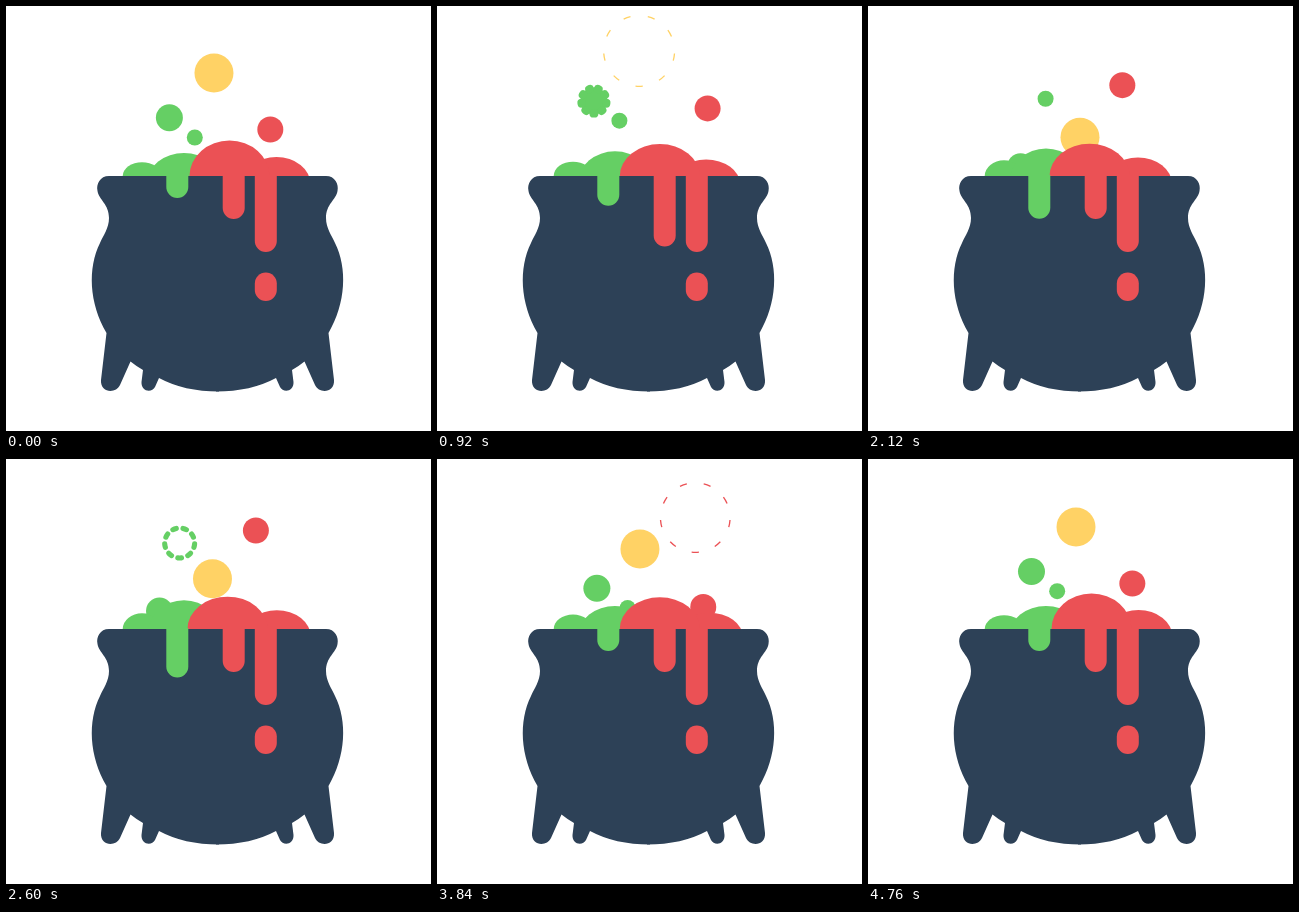
Animation of 425 by 425 pixels, one loop 4800 ms. Source, as an HTML page with a canvas:

```html
<!DOCTYPE html>
<html>
<head>
<meta charset="utf-8">
<style>
  html, body { margin: 0; width: 100%; height: 100%; overflow: hidden; background: #fff; }
  canvas { display: block; width: 425px; height: 425px; }
</style>
</head>
<body>
<canvas id="stage"></canvas>
<script>
const LOOP = 4800, BURST = 400, TAU = 2 * Math.PI;
const RED = '#eb5155', GREEN = '#65cf64', YELLOW = '#ffd265', NAVY = '#2d4157';
const canvas = document.getElementById('stage');
const ctx = canvas.getContext('2d');
const ratio = window.devicePixelRatio || 1;
canvas.width = canvas.height = 425 * ratio;
ctx.scale(ratio, ratio);

// A bubble rises between two heights, sways through evenly timed x positions, then bursts.
const bubbles = [
  { color: YELLOW, r: 19.5, spread: 37.5, birth: 800, pop: 5360, from: 163, to: 44, ease: 1,
    sway: [217, 215, 205, 202.8, 208, 202] },
  { color: GREEN, r: 13.5, spread: 31, birth: 1700, pop: 5680, from: 168.4, to: 88.4, ease: 1,
    sway: [152, 155.3, 163.7, 155] },
  { color: GREEN, r: 8, spread: 27, birth: 3200, pop: 7220, from: 160.7, to: 80, ease: 1,
    sway: [187, 192, 183.5, 180.5, 172.5] },
  { color: RED, r: 13, spread: 37.5, birth: 3100, pop: 8280, from: 168.6, to: 58.5, ease: 1.45,
    sway: [267, 266, 264.5, 270.5, 255.5, 249, 258.5] }
];

const pot = new Path2D(`M213 170H103C94 170 90 178 91.5 185C93 194 103 198 103 212
  C103 222 97 230 94 237C81.5 262 83 297 100.5 327L95 374C94 387 110 388 114 379
  L124.5 355.5Q130 360 137 364L135.5 376C135 386 146 387 149 381L153 372Q178 385.5 213 385.5Z`);

// Smooth curve through evenly spaced values, u from 0 to 1.
function curve(values, u) {
  const at = k => values[Math.max(0, Math.min(values.length - 1, k))];
  const pos = u * (values.length - 1), i = Math.floor(pos), f = pos - i;
  const [a, b, c, d] = [at(i - 1), at(i), at(i + 1), at(i + 2)];
  return b + f / 2 * (c - a + f * (2 * a - 5 * b + 4 * c - d + f * (3 * (b - c) + d - a)));
}

// Climbs from 0 to 1 until `peak`, then eases back to 0 by `end`.
function swell(t, peak, end) {
  if (t < peak) return (t / peak) ** 1.2;
  return t < end ? (1 + Math.cos(Math.PI * (t - peak) / (end - peak))) / 2 : 0;
}

function ellipse(x, y, rx, ry, color) {
  ctx.fillStyle = color;
  ctx.beginPath();
  ctx.ellipse(x, y, rx, ry, 0, 0, TAU);
  ctx.fill();
}

const mound = (x, top, base, rx, color) => ellipse(x, base, rx, base - top, color);

function pill(x, top, bottom, color, radii) {
  ctx.fillStyle = color;
  ctx.beginPath();
  ctx.roundRect(x, top, 22, bottom - top, radii);
  ctx.fill();
}

const drip = (x, bottom, color) => pill(x, 169, bottom, color, [0, 0, 11, 11]);

function burst(x, y, p, { color, r, spread }) {
  if (p < 0.15) ellipse(x, y, r, r, color);
  const inner = r - 3;
  const radius = inner + (spread - inner) * p;
  const half = 4 * p / radius + 0.001;
  ctx.strokeStyle = color;
  ctx.lineWidth = 9 - 8.5 * p;
  ctx.lineCap = p < 0.8 ? 'round' : 'butt';
  for (let i = 0; i < 9; i++) {
    const angle = TAU / 4 + i * TAU / 9;
    ctx.beginPath();
    ctx.arc(x, y, radius, angle - half, angle + half);
    ctx.stroke();
  }
}

function drawBubble(bubble, t) {
  const { birth, pop, from, to, ease, sway, r, color } = bubble;
  const u = (t - birth) / (pop + BURST - birth);
  if (u < 0 || u >= 1) return;
  const x = curve(sway, u), y = to + (from - to) * (1 - u) ** ease;
  if (t < pop) ellipse(x, y, r, r, color);
  else burst(x, y, (t - pop) / BURST, bubble);
}

function draw(t) {
  ctx.fillStyle = '#fff';
  ctx.fillRect(0, 0, 425, 425);
  for (const bubble of bubbles) {
    drawBubble(bubble, t);
    drawBubble(bubble, t + LOOP);
  }

  const phase = TAU * t / LOOP;
  const slow = Math.cos(phase), fast = Math.cos(2 * phase);
  mound(136, 155.3 + slow, 170, 19.3, GREEN);
  mound(178, 147 - 6 * swell(t, 2650, 3150), 176, 36.5, GREEN);
  mound(270.5 - 1.5 * Math.sin(phase), 152.5 - 1.5 * fast, 178, 34, RED);
  mound(222.5 + slow, 137.5 - 1.5 * (slow + fast), 170, 40, RED);

  ctx.fillStyle = NAVY;
  ctx.fill(pot);
  ctx.save();
  ctx.transform(-1, 0, 0, 1, 423, 0);
  ctx.fill(pot);
  ctx.restore();

  drip(160.3, 192 + 34.5 * swell(t, 3240, 3720), GREEN);
  drip(216.7, 213 + 27.5 * swell(t, 920, 1600), RED);
  drip(248.8, 246, RED);
  pill(248.8, 266.5, 295, RED, 11);
}

const start = performance.now();
function tick() {
  draw((performance.now() - start) % LOOP);
  requestAnimationFrame(tick);
}
tick();
</script>
</body>
</html>
```
